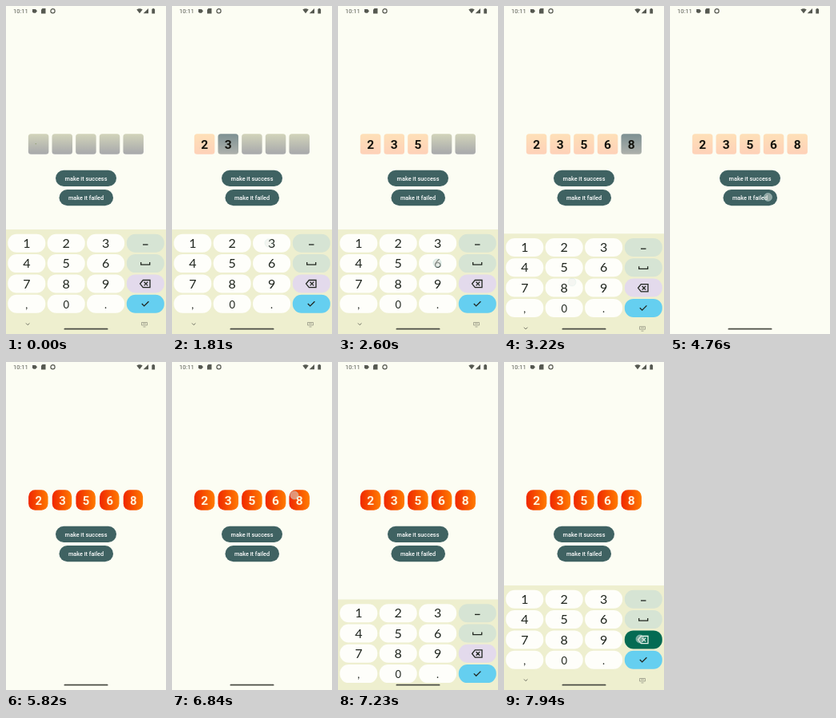
Recreate the animation shown at these times as an HTML page with a canvas. Size 200 by 411 pixels, loop 8000 ms.

```html
<!DOCTYPE html>
<html lang="en">
<head>
<meta charset="utf-8">
<style>
html, body { margin: 0; width: 100%; height: 100%; overflow: hidden; background: #fcfdf3; }
canvas { display: block; width: 200px; height: 411px; }
</style>
</head>
<body>
<canvas id="stage"></canvas>
<script>
const LOOP = 8000;
const INK = '#20261f';
const BUTTON = '#3f6262';
const EMPTY = [[210, 212, 186], [167, 168, 171]];
const ACTIVE = [[125, 144, 146], [174, 177, 172]];
const FILLED = [[254, 224, 184], [254, 209, 184]];
const FAILED = [[240, 40, 0], [255, 124, 0]];

// Typed digit, time it appears, and where the finger lands
const entries = [
  ['2', 1270, 72, 297], ['3', 1750, 121, 297], ['5', 2220, 75, 322],
  ['6', 2680, 124, 322], ['8', 3150, 85, 346]
];
// Finger contacts: start, end, x, y
const touches = [
  ...entries.map(([, at, x, y]) => [at - 80, at, x, y]),
  [4760, 4940, 122.5, 239.5], [6840, 6930, 153, 167], [7940, 8100, 170, 347]
];

const canvas = document.getElementById('stage');
const ctx = canvas.getContext('2d');
const ratio = window.devicePixelRatio || 1;
canvas.width = 200 * ratio;
canvas.height = 411 * ratio;

const ramp = (t, from, to) => Math.min(1, Math.max(0, (t - from) / (to - from)));
const smooth = p => p * p * (3 - 2 * p);
const mix = (a, b, p) => a.map((c, i) => c.map((v, j) => v + (b[i][j] - v) * p));

function box(x, y, w, h, r, fill) {
  ctx.fillStyle = fill;
  ctx.beginPath();
  ctx.roundRect(x, y, w, h, r);
  ctx.fill();
}

function circle(x, y, r) {
  ctx.beginPath();
  ctx.arc(x, y, r, 0, 7);
}

function label(text, x, y, size, fill, weight = 400, family = 'Roboto') {
  ctx.font = `${weight} ${size}px ${family}, sans-serif`;
  ctx.textAlign = 'center';
  ctx.fillStyle = fill;
  ctx.fillText(text, x, y + size * 0.356);
}

function stroke(path, color, width = 1.3) {
  ctx.strokeStyle = color;
  ctx.lineWidth = width;
  ctx.stroke(new Path2D(path));
}

function fillPath(path, color) {
  ctx.fillStyle = color;
  ctx.fill(new Path2D(path));
}

function drawStatusBar() {
  const gray = '#565951';
  label('10:11', 18.3, 6.3, 7.5, gray);
  fillPath('M33 4h4l2 2.2-2 2.6h-2.6l-1.4-1.6z', gray);
  fillPath('M45.5 3h4v6.500h-5.500v-5z', gray);
  ctx.strokeStyle = gray;
  ctx.lineWidth = 1.2;
  circle(58.5, 6.3, 2.6);
  ctx.stroke();
  fillPath('M163.3 4.6Q167 2 170.7 4.6L167 9.3z', gray);
  fillPath('M178 3v6.300h-6.300z', gray);
  fillPath('M182.3 3.800h1v-.8h1.800v.8h1v5.700h-3.800z', gray);
}

function drawDigitBox(i, t) {
  const [digit, at] = entries[i];
  const error = smooth(ramp(t, 4940, 5300));
  const shake = ramp(t, 4940, 6000);
  const shift = 4 * Math.sin(6 * Math.PI * shake);
  const turn = 0.58 * Math.sin(Math.PI * shake);
  let colors = mix(EMPTY, ACTIVE, ramp(t, at - 40, at + 40));
  colors = mix(colors, FILLED, smooth(ramp(t, at + 80, at + 340)));
  colors = mix(colors, FAILED, error);

  const size = 25.5, half = size / 2;
  const gradient = ctx.createLinearGradient(
    -half, -half, -half + size * error, -half + size * (1 - error));
  colors.forEach((c, n) => gradient.addColorStop(n, `rgb(${c})`));

  ctx.save();
  ctx.translate(40.6 + 29.65 * i + shift, 173);
  ctx.scale(Math.cos(turn), 1);
  // A turned box looks off-centre because its near edge is wider
  box(-half - 1.6 * Math.sin(turn), -half, size, size, 3.5 + 5 * error, gradient);
  if (t >= at) {
    const [ink] = mix([[20, 20, 14]], [[255, 243, 218]], error);
    label(digit, 0, 0, 15.5, `rgb(${ink})`, 700);
  }
  ctx.restore();
}

function drawButtons(t) {
  box(62, 205.7, 76, 20.3, 10.2, BUTTON);
  label('make it success', 100, 216, 7.3, '#fff', 500);
  box(66.5, 230, 67.5, 20.3, 10.2, BUTTON);
  const ripple = ramp(t, 4900, 5050) * (1 - ramp(t, 5450, 5730));
  box(66.5, 230, 67.5, 20.3, 10.2, `rgba(255,255,255,${0.1 * ripple})`);
  label('make it failed', 100, 240.3, 7.3, '#fff', 500);
}

function drawKeyboard(t) {
  const hide = ramp(t, 3180, 3470) ** 1.65;
  const show = 1 - (1 - ramp(t, 7040, 7430)) ** 3;
  const offset = 131 * (hide - show);
  if (offset > 130.9) return;
  const erasing = t >= 7940;
  const sideFills = ['#d6e4d4', '#d6e4d4', erasing ? '#046b53' : '#e3daec', '#65cff0'];

  ctx.save();
  ctx.translate(0, offset);
  box(0, 280, 200, 131, 0, '#eeefcf');
  ['1', '2', '3', '4', '5', '6', '7', '8', '9', ',', '0', '.'].forEach((key, i) => {
    const column = i % 3, row = Math.floor(i / 3);
    const y = 297.3 + 25.3 * row;
    box(2.3 + 49.4 * column, y - 11.5, 47, 23, 11, '#fefefa');
    label(key, 25.8 + 49.4 * column, y + (row > 2 ? 1 : 0), row > 2 ? 13 : 16, INK, 400, 'Lato');
  });
  sideFills.forEach((fill, row) => box(150.8, 285.8 + 25.3 * row, 47, 23, 11, fill));
  stroke('M171 299h6.500', INK);
  stroke('M168.7 321v3.200h11V321', INK);
  stroke('M171.3 343.500h8.700v9.200h-8.700l-3.700-4.600zM172.6 345.800l4.600 4.600M177.2 345.800l-4.600 4.600',
    erasing ? '#e8f5ec' : INK);
  stroke('M169.8 373l2.900 2.900 5.700-5.700', INK);
  stroke('M25 397.500l2.200 2.200 2.200-2.200', '#6c6e60', 1);
  stroke('M169.5 396.500h7v3.500h-7zM171 398h4M171.5 402h3', '#8a8c7c', 0.7);
  ctx.restore();
}

function drawTouches(t) {
  ctx.lineWidth = 0.8;
  for (const [start, end, x, y] of touches) {
    const alpha = t < start ? 0 : 1 - ramp(t, end, end + 120);
    if (!alpha) continue;
    circle(x, y, 5);
    ctx.fillStyle = `rgba(213,221,215,${0.55 * alpha})`;
    ctx.fill();
    ctx.strokeStyle = `rgba(180,218,212,${0.6 * alpha})`;
    ctx.stroke();
  }
}

function draw(t) {
  ctx.setTransform(ratio, 0, 0, ratio, 0, 0);
  box(0, 0, 200, 411, 0, '#fcfdf3');
  drawStatusBar();
  entries.forEach((_, i) => drawDigitBox(i, t));
  if (t < 930) box(36.6, 172, 1.3, 1.3, 0.6, '#8b9a6b');
  drawButtons(t);
  drawKeyboard(t);
  box(72.5, 403.8, 55, 1.8, 0.9, '#4b4d45');
  drawTouches(t);
}

const begin = performance.now();
function tick() {
  draw((performance.now() - begin) % LOOP);
  requestAnimationFrame(tick);
}
tick();
</script>
</body>
</html>
```
